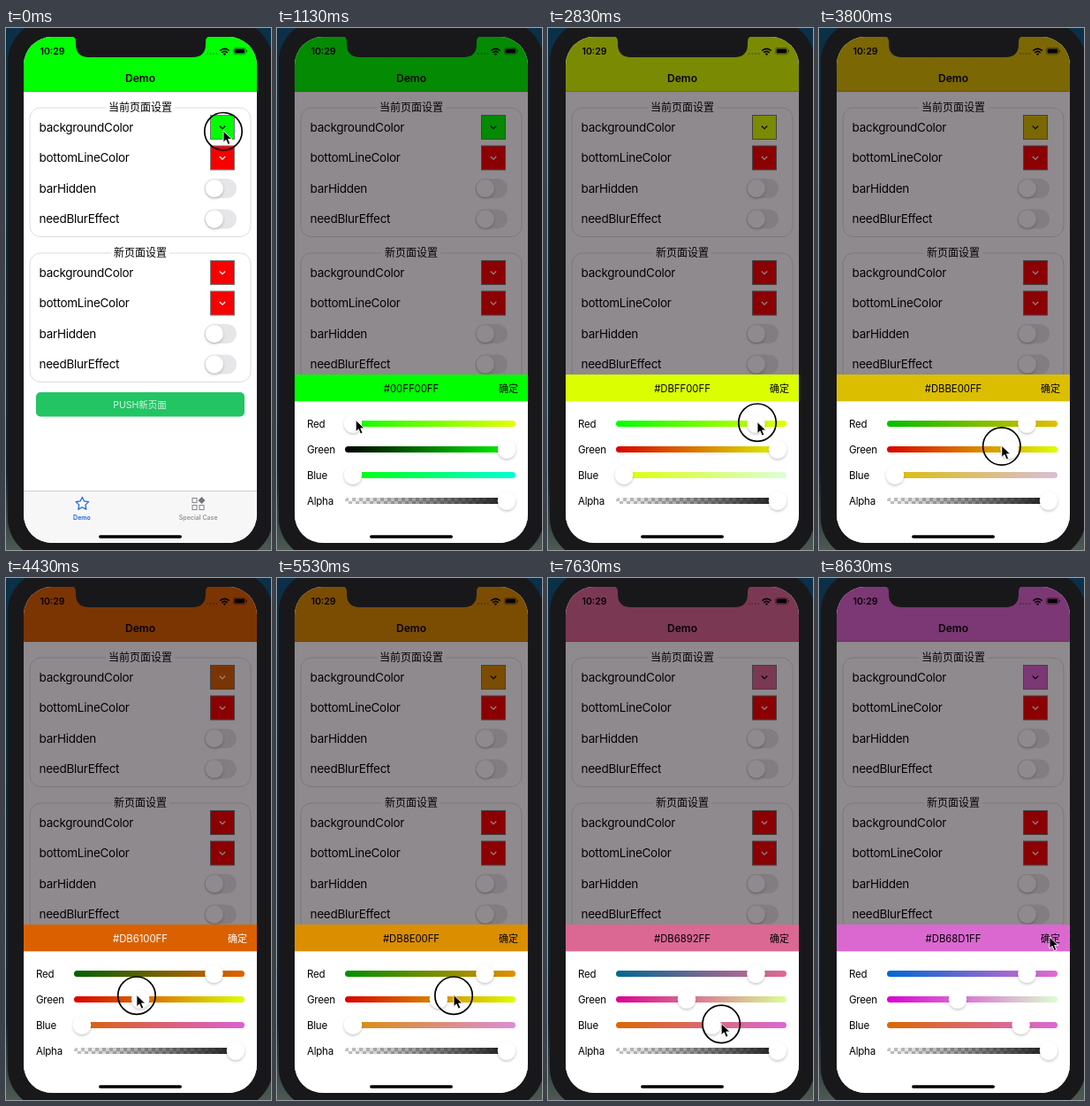
An HTML page for the animation above (8.66 s loop, 300 by 589 pixels).

```html
<!DOCTYPE html>
<html lang="zh">
<head>
<meta charset="utf-8">
<title>Color settings demo</title>
<style>
  html, body { margin: 0; width: 100%; height: 100%; overflow: hidden; background: #0b2a3f; }
  svg { display: block; width: 300px; height: 589px; }
  text { font-family: Inter, "Noto Sans CJK SC", "Noto Sans CJK", sans-serif; fill: #000; }
  .mid { text-anchor: middle; }
  .bold { font-weight: 600; }
  .row { font-size: 13.5px; letter-spacing: -0.02em; }
  .legend { font-size: 12px; }
  .label { font-size: 11.5px; letter-spacing: -0.02em; }
  .tab { font-size: 7px; }
</style>
</head>
<body>
<svg id="stage" viewBox="0 0 300 589">
  <defs>
    <clipPath id="screen"><rect x="20" y="10" width="264" height="571" rx="32"/></clipPath>
    <filter id="soft" x="-50%" y="-50%" width="200%" height="200%">
      <feDropShadow dx="0" dy="1.5" stdDeviation="1.6" flood-opacity=".25"/>
    </filter>
    <pattern id="checks" x="77" y="530" width="8" height="8" patternUnits="userSpaceOnUse">
      <rect width="8" height="8" fill="#fff"/>
      <path d="M0 0h4v8h4V4H0z" fill="#c4c4c4"/>
    </pattern>
    <linearGradient id="desk" x2="0" y2="1">
      <stop offset="0" stop-color="#0b3048"/>
      <stop offset=".85" stop-color="#0b2233"/>
      <stop offset="1" stop-color="#4d5a52"/>
    </linearGradient>
  </defs>

  <rect width="300" height="589" fill="url(#desk)"/>
  <rect x="2" y="-8" width="300" height="607" rx="46" fill="#18181b"/>

  <g clip-path="url(#screen)">
    <rect x="20" y="10" width="264" height="571" fill="#fff"/>
    <rect id="navbar" x="20" y="10" width="264" height="62"/>
    <rect x="20" y="71.6" width="264" height=".5" fill="#f00" opacity=".6"/>
    <text class="bold" x="38.5" y="30" font-size="10.5">10:29</text>
    <g fill="#000">
      <g opacity=".3">
        <circle cx="228" cy="29" r="1"/><circle cx="231.5" cy="29" r="1"/>
        <circle cx="235" cy="29" r="1"/><circle cx="238.5" cy="29" r="1"/>
      </g>
      <g fill="none" stroke="#000" stroke-width="1.6">
        <path d="M242.3 25.6q5.2-4.6 10.4 0M244.3 27.8q3.2-2.8 6.4 0"/>
      </g>
      <path d="M245.8 29.3q1.7-1.4 3.4 0l-1.7 1.8z"/>
      <rect x="257.4" y="22.4" width="14" height="7.4" rx="2" fill="none" stroke="#000" stroke-width=".7" opacity=".5"/>
      <rect x="258.6" y="23.6" width="11.6" height="5" rx="1"/>
      <rect x="272" y="24.8" width="1" height="2.6" rx=".5" opacity=".5"/>
    </g>
    <text class="bold mid" x="152" y="60.5" font-size="12">Demo</text>

    <g id="groups"></g>

    <rect x="34" y="411" width="236" height="27.5" rx="5" fill="#22c464"/>
    <text class="mid" x="151.5" y="428.5" font-size="10.5" style="fill:#d8f5e3">PUSH新页面</text>

    <rect x="20" y="522" width="264" height="60" fill="#f7f7f8"/>
    <rect x="20" y="522" width="264" height=".6" fill="#b8b8b8"/>
    <path id="star" fill="none" stroke="#1464e0" stroke-width="1.2" stroke-linejoin="round"/>
    <text class="tab bold mid" x="86" y="555" style="fill:#1464e0">Demo</text>
    <g fill="none" stroke="#8a8a8e" stroke-width="1.1">
      <rect x="211" y="530.5" width="5" height="5"/>
      <rect x="211" y="538.5" width="5" height="5"/>
      <rect x="219" y="538.5" width="5" height="5"/>
      <path d="M221.5 529l4 4-4 4-4-4z" fill="#77777b" stroke="none"/>
    </g>
    <text class="tab bold mid" x="217.7" y="555" style="fill:#929296">Special Case</text>

    <rect id="dim" x="20" y="10" width="264" height="571" fill="#0a0008"/>

    <g id="sheet">
      <rect x="20" y="391" width="264" height="191" fill="#fff"/>
      <rect id="sheetBar" x="20" y="391" width="264" height="30.3"/>
      <text id="hex" class="mid" x="152" y="411" font-size="11.3"></text>
      <text id="done" x="251" y="410.5" font-size="11">确定</text>
      <g id="sliders"></g>
    </g>
    <rect x="105" y="572.2" width="94" height="3.6" rx="1.8"/>
    <path d="M74 9q5 1 5 6v3q0 15 15 15h117q15 0 15-15v-3q0-5 5-6z" fill="#18181b"/>
  </g>

  <g id="pointer">
    <circle id="ring" cy=".7" r="21.2" fill="none" stroke="#000" stroke-width="1.7"/>
    <path d="M0 0v13.2l3.1-2.9 2.2 5.2 2.5-1.1-2.2-5h4.2z" stroke="#fff" stroke-width=".9"/>
  </g>
</svg>

<script>
const LOOP = 8660;
const $ = id => document.getElementById(id);

function add(parent, tag, attrs, text) {
  const el = document.createElementNS('http://www.w3.org/2000/svg', tag);
  for (const k in attrs) el.setAttribute(k, attrs[k]);
  if (text) el.textContent = text;
  parent.appendChild(el);
  return el;
}

// Settings cards
function addSwatch(g, y, fill) {
  const box = add(g, 'rect', { x: 231.5, y: y - 13.5, width: 27, height: 27, fill, stroke: '#777', 'stroke-width': 1 });
  const arrow = add(g, 'path', { d: `M241.8 ${y - 1.5}l3.2 3.2 3.2-3.2`, fill: 'none', stroke: '#fff', 'stroke-width': 1.1 });
  return { box, arrow };
}

function addSwitch(g, y) {
  add(g, 'rect', { x: 224.5, y: y - 11, width: 36.5, height: 22, rx: 11, fill: '#e6e6e8' });
  add(g, 'circle', { cx: 235.8, cy: y, r: 10, fill: '#fff', filter: 'url(#soft)' });
}

function addCard(title, top, gap) {
  const g = $('groups');
  add(g, 'rect', { x: 27, y: top, width: 250, height: 145.5, rx: 12, fill: '#fff', stroke: '#dcdcde', 'stroke-width': 1 });
  add(g, 'rect', { x: 152 - gap / 2, y: top - 2, width: gap, height: 4, fill: '#fff' });
  add(g, 'text', { class: 'legend mid', x: 152, y: top + 4.3 }, title);
  const names = ['backgroundColor', 'bottomLineColor', 'barHidden', 'needBlurEffect'];
  const rows = names.map((name, i) => {
    const y = top + 22 + i * 34.5;
    add(g, 'text', { class: 'row', x: 37.5, y: y + 4.8 }, name);
    return i < 2 ? addSwatch(g, y, '#f80000') : addSwitch(g, y);
  });
  return rows[0];
}

const swatch = addCard('当前页面设置', 90, 78);
addCard('新页面设置', 254, 66);

// Tab star
$('star').setAttribute('d', 'M' + Array.from({ length: 10 }, (_, i) => {
  const r = i % 2 ? 3.8 : 7.6, a = i * Math.PI / 5;
  return [(86.3 + r * Math.sin(a)).toFixed(2), (537 - r * Math.cos(a)).toFixed(2)];
}).join('L') + 'z');

// Sliders
const TRACK_END = [228, 255, 215];
const defs = document.querySelector('defs');
const sliders = ['Red', 'Green', 'Blue', 'Alpha'].map((name, i) => {
  const g = $('sliders'), y = 446.5 + i * 29;
  const grad = add(defs, 'linearGradient', { id: 'grad' + i });
  const stops = [0, 1].map(offset => add(grad, 'stop', { offset }));
  const track = { x: 77, y: y - 3.5, width: 193, height: 7, rx: 3.5 };
  add(g, 'text', { class: 'label', x: 34, y: y + 4.2 }, name);
  if (i === 3) add(g, 'rect', { ...track, fill: 'url(#checks)' });
  add(g, 'rect', { ...track, fill: `url(#grad${i})` });
  const thumb = add(g, 'circle', { cx: 260, cy: y, r: 10.2, fill: '#fff', filter: 'url(#soft)' });
  return { stops, thumb };
});
sliders[3].stops.forEach((s, i) => {
  s.setAttribute('stop-color', '#141414');
  s.setAttribute('stop-opacity', i);
});

// Motion tables: [ms, value]
const RED = [[1350, 0], [1700, 45], [2300, 175], [2700, 219]];
const GREEN = [[3350, 255], [3800, 190], [4430, 97], [4700, 72], [5530, 142], [5750, 160], [6300, 111], [6600, 104]];
const BLUE = [[7100, 0], [7500, 110], [7950, 209]];
const POINT_X = [[0, 246], [480, 246], [1080, 90], [1300, 88], [1660, 120], [2260, 207], [2680, 237], [2920, 237],
  [3220, 261], [3300, 261], [3740, 213], [4430, 148], [4640, 135], [5530, 200], [5680, 203], [6300, 164], [6560, 157],
  [6680, 157], [7000, 86], [7070, 86], [7450, 163], [7920, 229], [8080, 229], [8420, 261]];
const POINT_Y = [[0, 116], [480, 116], [1080, 441], [1300, 444.5], [2920, 444.5], [3220, 472], [4430, 470.5],
  [5530, 470.5], [6300, 474.5], [6680, 475], [7000, 503], [8080, 502], [8420, 405]];
const PRESSES = [[0, 160], [1260, 2900], [3290, 6640], [7060, 8020]];

// Cubic curve through the points, flat at turning points and ends
function curve(pts, t) {
  const last = pts.length - 1;
  if (t <= pts[0][0]) return pts[0][1];
  if (t >= pts[last][0]) return pts[last][1];
  const i = pts.findIndex(p => p[0] > t) - 1;
  const rate = k => (pts[k + 1][1] - pts[k][1]) / (pts[k + 1][0] - pts[k][0]);
  const slope = k => {
    if (k === 0 || k === last) return 0;
    const a = rate(k - 1), b = rate(k);
    return a * b > 0 ? 2 * a * b / (a + b) : 0;
  };
  const [t0, v0] = pts[i], [t1, v1] = pts[i + 1];
  const d = t1 - t0, u = (t - t0) / d, w = 1 - u;
  return v0 * w * w * (1 + 2 * u) + v1 * u * u * (3 - 2 * u)
    + d * u * w * (slope(i) * w - slope(i + 1) * u);
}

const css = c => `rgb(${c.join(',')})`;

function render(t) {
  const rgb = [RED, GREEN, BLUE].map(pts => Math.round(curve(pts, t)));
  const color = css(rgb);
  const luma = 0.299 * rgb[0] + 0.587 * rgb[1] + 0.114 * rgb[2];
  const ink = luma > 127 ? '#000' : '#fff';

  for (const el of [$('navbar'), $('sheetBar'), swatch.box]) el.setAttribute('fill', color);
  swatch.arrow.setAttribute('stroke', ink);
  $('hex').style.fill = $('done').style.fill = ink;
  $('hex').textContent = '#' + [...rgb, 255].map(v => v.toString(16).padStart(2, '0')).join('').toUpperCase();

  rgb.forEach((v, i) => {
    const { stops, thumb } = sliders[i];
    thumb.setAttribute('cx', 86 + v / 255 * 174);
    stops.forEach((s, end) => s.setAttribute('stop-color', css(rgb.map((c, k) => k === i ? end * TRACK_END[i] : c))));
  });

  const open = 1 - (1 - Math.min(1, Math.max(0, (t - 200) / 350))) ** 3;
  $('sheet').setAttribute('transform', `translate(0 ${(1 - open) * 192})`);
  $('dim').setAttribute('opacity', open * 0.46);

  $('pointer').setAttribute('transform', `translate(${curve(POINT_X, t)} ${curve(POINT_Y, t)})`);
  const down = PRESSES.some(([a, b]) => t >= a && t < b);
  $('ring').setAttribute('visibility', down ? 'visible' : 'hidden');
}

const start = performance.now();
function tick() {
  render((performance.now() - start) % LOOP);
  requestAnimationFrame(tick);
}
tick();
</script>
</body>
</html>
```
